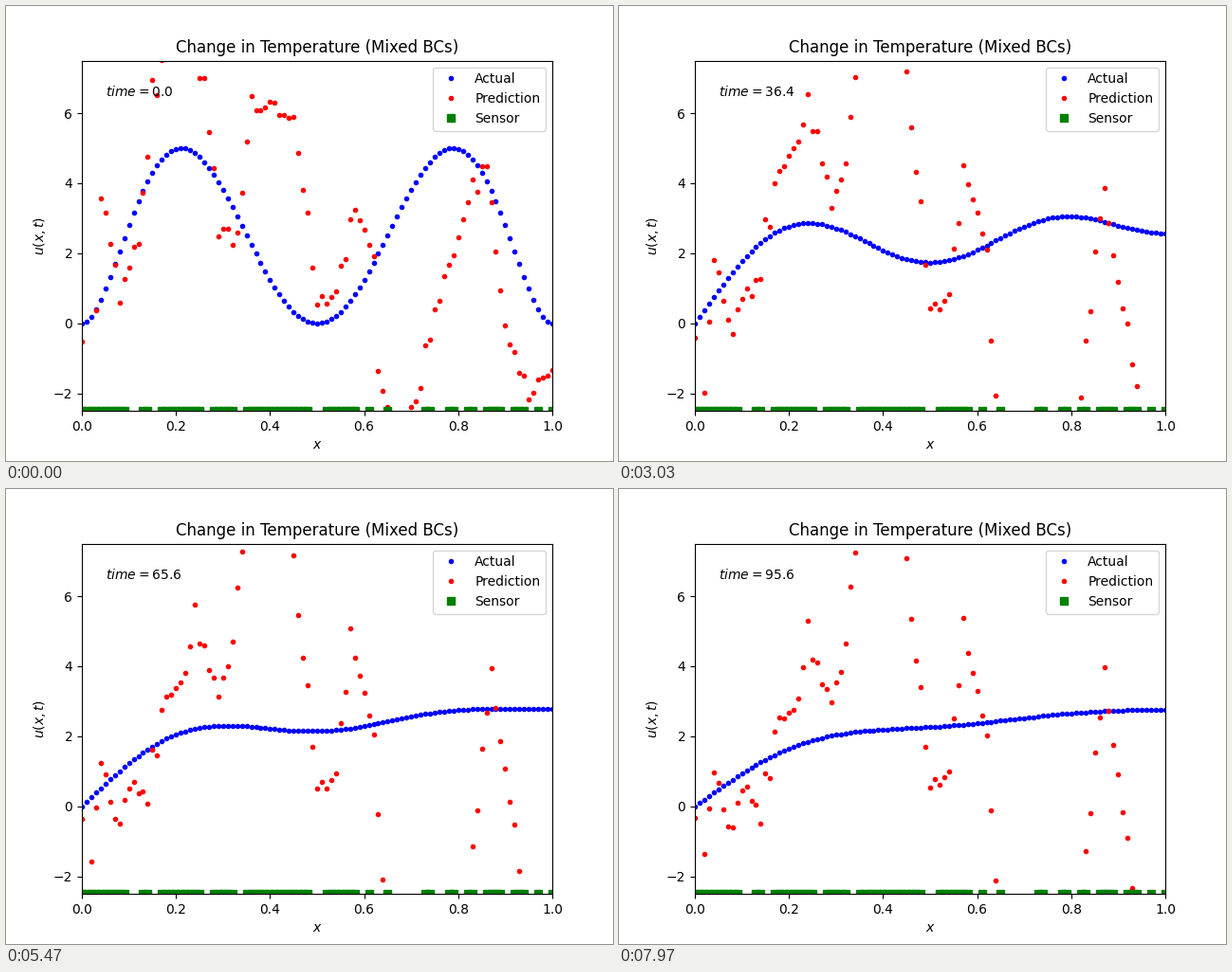
Recreate the animation shown at these times as a matplotlib script. Size 640 by 480 pixels, loop 8000 ms.

```python
import numpy as np
import matplotlib.pyplot as plt
from matplotlib.animation import FuncAnimation

FRAMES, INTERVAL = 320, 25
STEPS = 240         # simulation steps per loop
DT = 0.4            # simulated time per step
ALPHA = 0.0003      # diffusivity
TAU = 40.0          # relaxation time of the prediction
T_END = DT * (STEPS - 1)

N = 100
cells = np.arange(N + 1)
x = cells / N

# Heat equation, u(0) = 0 and u'(1) = 0, as a sum of decaying sine modes
k = (np.arange(80) + 0.5) * np.pi
fine = (np.arange(4000) + 0.5) / 4000


def initial(s):
    return 2160 * (s * (1 - s) * (s - 0.5)) ** 2


coef = 2 * np.sin(np.outer(k, fine)) @ initial(fine) / fine.size
modes = np.sin(np.outer(x, k))


def actual(t):
    return modes @ (coef * np.exp(-ALPHA * k ** 2 * t))


def curve(*points):
    """Piecewise linear profile over the grid cells."""
    return np.interp(cells, *zip(*points))


# The prediction relaxes from one jagged profile to another, bowing on the way
first = curve(
    (0, -.4), (1, -9), (2, -3.4), (4, 3.9), (8, .9), (12, 2.2), (15, 6.5),
    (21, 8.9), (26, 7), (29, 2.9), (33, 2.4), (36, 6.3), (45, 6), (50, .6),
    (54, .9), (58, 3.3), (62, 1.7), (63, -1.4), (68, -4), (78, 2), (86, 4.6),
    (90, .1), (95, -2.2), (100, -1.3))
last = curve(
    (0, -.2), (1, -9), (2, -1.7), (4, 1.3), (7, -.6), (10, .4), (14, -.2),
    (18, 2.6), (22, 3), (24, 5), (28, 3.2), (31, 3.8), (34, 7.2), (40, 10.5),
    (44, 9), (46, 5.4), (50, .6), (54, 1), (57, 5.1), (62, 1.8), (66, -6),
    (78, -10.5), (84, 0), (87, 4), (92, -.9), (95, -4.8), (100, -6.1))
bow = curve(
    (0, 0), (10, -.15), (16, 0), (30, .6), (34, 1.1), (43, .85), (51, -.25),
    (62, .15), (78, -1.3), (83, -1.2), (88, .4), (92, .95), (100, 1))
jitter = np.random.default_rng(4).normal(0, 0.2, N + 1)


def prediction(t):
    s = (1 - np.exp(-t / TAU)) / (1 - np.exp(-T_END / TAU))
    return first + (last - first) * s + 4 * bow * s * (1 - s) + jitter


# Runs of neighbouring cells that carry a sensor
runs = [(0, 9), (13, 14), (17, 25), (28, 32), (35, 48), (52, 58), (61, 61),
        (65, 65), (73, 74), (78, 79), (82, 83), (86, 89), (92, 94), (97, 97),
        (100, 100)]
sensors = np.concatenate([x[a:b + 1] for a, b in runs])

fig, ax = plt.subplots(figsize=(6.4, 4.8), dpi=100)
ax.set(xlim=(0, 1), ylim=(-2.5, 7.5), xlabel='$x$', ylabel='$u(x,t)$',
       title='Change in Temperature (Mixed BCs)')
actual_dots, = ax.plot(x, actual(0), 'b.', label='Actual')
pred_dots, = ax.plot(x, prediction(0), 'r.', label='Prediction')
ax.plot(sensors, np.full(sensors.size, -2.5), 'gs', label='Sensor')
clock = ax.text(0.05, 6.5, '$time = 0.0$')
ax.legend(loc='upper right')


def update(i):
    step = int(i * STEPS / FRAMES + 0.5)    # nearest simulation step
    t = DT * min(step, STEPS - 1)
    actual_dots.set_ydata(actual(t))
    pred_dots.set_ydata(prediction(t))
    clock.set_text(f'$time = {t:.1f}$')
    return actual_dots, pred_dots, clock


anim = FuncAnimation(fig, update, frames=FRAMES, interval=INTERVAL,
                     repeat=True, repeat_delay=0)
plt.show()
```
